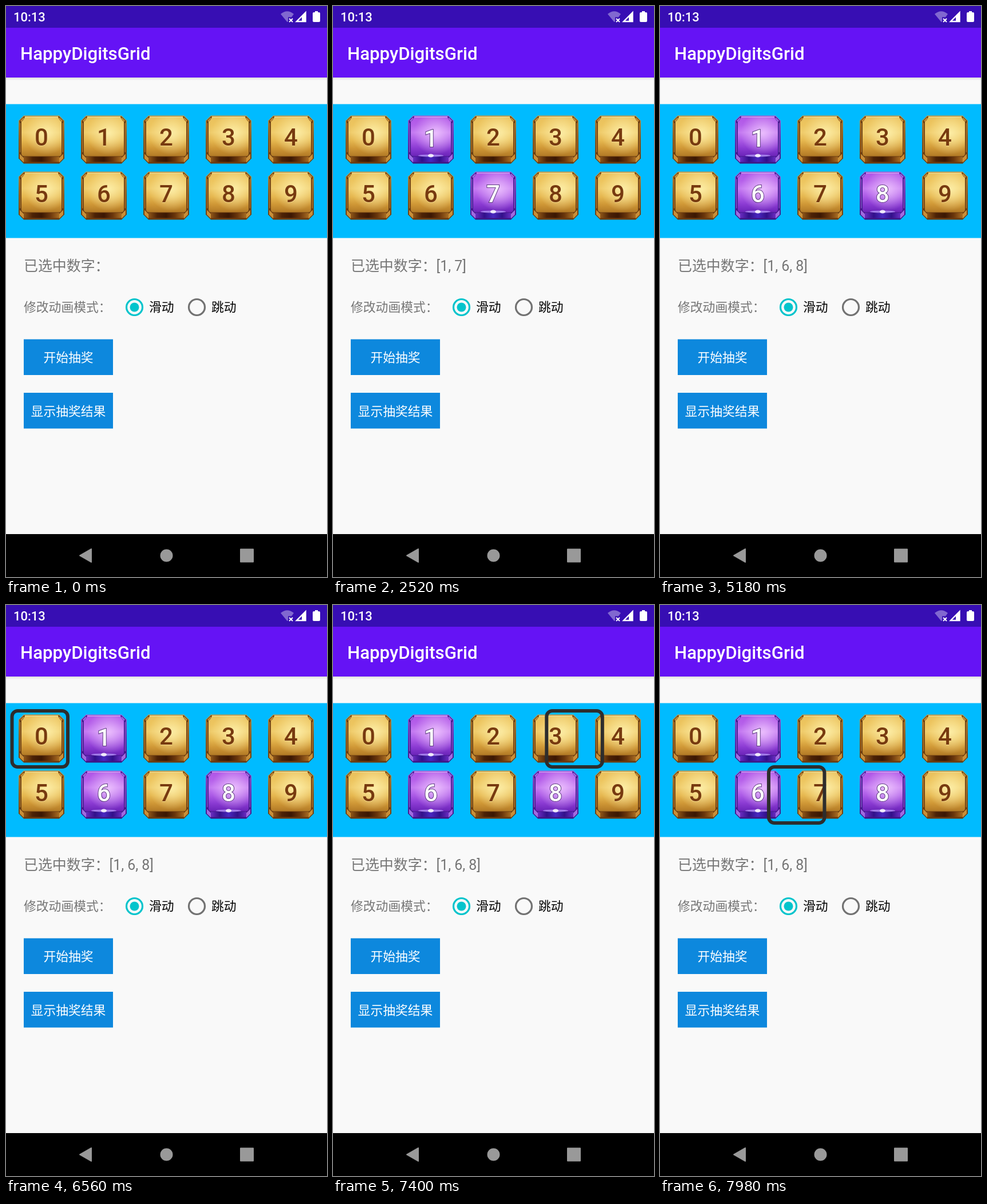
Write an HTML page that moves like this. It is 561 px wide and 998 px high and loops after 8 s.

```html
<!DOCTYPE html>
<html lang="zh-CN">
<head>
<meta charset="utf-8">
<style>
html, body { margin: 0; height: 100%; overflow: hidden; background: #f9f9f9; }
svg { display: block; width: 100%; height: 100%; }
text { font-family: Roboto, 'Noto Sans CJK SC', 'Noto Sans CJK', sans-serif; font-size: 21.8px; }
.digit { font-size: 42px; font-weight: 500; text-anchor: middle; }
.button { fill: #fff; text-anchor: middle; }
</style>
</head>
<body>
<svg viewBox="0 0 561 998">
  <defs id="defs">
    <linearGradient id="shade" x2="0" y2="1">
      <stop stop-color="#000" stop-opacity=".13"/><stop offset="1" stop-color="#000" stop-opacity="0"/>
    </linearGradient>
  </defs>
  <rect width="561" height="998" fill="#f9f9f9"/>
  <rect y="124" width="561" height="6" fill="url(#shade)"/>
  <rect y="37" width="561" height="88" fill="#6513f5"/>
  <rect width="561" height="38" fill="#370eb3"/>
  <text x="13" y="27" fill="#fff" style="font-size:22px;font-weight:500">10:13</text>
  <text x="25" y="94" fill="#fff" style="font-size:31.2px;font-weight:500">HappyDigitsGrid</text>

  <path d="M480 14Q491.500 4.500 503 14L499 19.500H493V27L491.500 28Z" fill="#8168d0"/>
  <path d="M495 22L501 28M501 22L495 28" stroke="#fff" stroke-width="2"/>
  <path d="M508 27H523.500V11.500Z" fill="none" stroke="#fff" stroke-width="2.400"/>
  <path d="M517 18L524 11V27H517Z" fill="#fff"/>
  <path d="M540 9H545V11H547Q549 11 549 13V26Q549 28 547 28H538Q536 28 536 26V13Q536 11 538 11H540Z" fill="#fff"/>

  <rect y="171.500" width="561" height="234" fill="#00bbff"/>
  <g id="tiles"></g>
  <rect id="cursor" x="-11.500" y="-6.500" width="97.500" height="98" rx="10" fill="none" stroke="#2d2d2d" stroke-width="6"/>

  <g fill="#757575">
    <text id="label" x="31" y="463" style="font-size:24.93px"></text>
    <text x="31" y="534">修改动画模式：</text>
  </g>
  <g fill="none" stroke-width="3.200">
    <circle cx="224.500" cy="526.500" r="14" stroke="#03c4cc"/>
    <circle cx="333.500" cy="526.500" r="14" stroke="#727272"/>
  </g>
  <circle cx="224.500" cy="526.500" r="8" fill="#03c4cc"/>
  <text x="250" y="534">滑动</text>
  <text x="359" y="534">跳动</text>
  <path d="M31 582.500H187V645H31ZM31 676H187V738.500H31Z" fill="#0d88dd"/>
  <text class="button" x="109" y="622">开始抽奖</text>
  <text class="button" x="109" y="715.500">显示抽奖结果</text>

  <rect y="923" width="561" height="75" fill="#000"/>
  <g fill="#999" stroke="#999" stroke-width="2" stroke-linejoin="round">
    <path d="M129 960.500L149 949V972Z"/>
    <circle cx="280.500" cy="960.500" r="10"/>
    <rect x="410" y="949.500" width="22" height="22"/>
  </g>
</svg>
<script>
const $ = id => document.getElementById(id);
const LOOP = 8000;

const stops = colors => colors.map((c, i) =>
  `<stop offset="${i / (colors.length - 1)}" stop-color="${c}"/>`).join('');

// A bevelled 80 x 84 key
function keyFace(id, { edge, face, bar, facet, glow, dark }, extra = '') {
  $('defs').innerHTML += `
    <linearGradient id="${id}Edge" x2="0" y2="1">${stops(edge)}</linearGradient>
    <linearGradient id="${id}Face" x2="0" y2="1">${stops(face)}</linearGradient>
    <linearGradient id="${id}Bar">${stops(bar)}</linearGradient>
    <radialGradient id="${id}Glow" cx=".62" cy=".42" r=".55">
      <stop stop-color="${glow}" stop-opacity=".85"/><stop offset="1" stop-color="${glow}" stop-opacity="0"/>
    </radialGradient>
    <g id="${id}">
      <path d="M9 0H71L80 9V75L71 84H9L0 75V9Z" fill="url(#${id}Edge)"/>
      <path d="M9 1.5H71L78.500 9V74L71 82H9L1.500 74V9Z" fill="${dark}"/>
      <path d="M2 67L9 74V82L2 75ZM78 67L71 74V82L78 75ZM3 9L9 3V6L5 11ZM77 9L71 3V6L75 11Z" fill="${facet}"/>
      <path d="M2 13H3.500V64H2ZM76.500 13H78V64H76.500Z" fill="${facet}" opacity=".7"/>
      <rect x="9" y="72" width="62" height="9" fill="url(#${id}Bar)"/>
      <path id="${id}Top" d="M11 2H69Q71 8 75 11V66Q75 71 70 71H10Q5 71 5 66V11Q9 8 11 2Z" fill="url(#${id}Face)"/>
      <path d="M11 2H69Q71 8 75 11V66Q75 71 70 71H10Q5 71 5 66V11Q9 8 11 2Z" fill="url(#${id}Glow)"/>
      <path d="M11 2.500H69" stroke="${glow}"/>${extra}
    </g>`;
}

keyFace('gold', {
  edge: ['#c89a45', '#8a5a1c', '#6b3b10'],
  face: ['#e9c05c', '#edc55f', '#f0cd6d', '#e6b850', '#cf9736', '#b27a26'],
  bar: ['#8f5618', '#4c2206', '#3b1703', '#6a360c', '#a86c22'],
  facet: '#c98f38', glow: '#fff3b0', dark: '#6a3c10'
});
keyFace('violet', {
  edge: ['#a463dc', '#6a2cb8', '#3b1580'],
  face: ['#b055e6', '#b560ea', '#c67cf2', '#ab5ae6', '#8a3ad2', '#6b24b8'],
  bar: ['#6a2cc0', '#32108a', '#4a28c0', '#32108a', '#6a2cc0'],
  facet: '#a06be0', glow: '#f0c8ff', dark: '#43188c'
}, `<ellipse cx="40" cy="70" rx="22" ry="2" fill="#b9a0ff" opacity=".7"/>
    <ellipse cx="40" cy="70" rx="5" ry="3" fill="#fff" opacity=".85"/>`);

const spot = n => ({ x: 22 + 109 * (n % 5), y: 191.5 + 98 * Math.floor(n / 5) });

function digit(n, dy, style) {
  return `<text class="digit" x="40" y="${(n < 5 ? 52.5 : 53.5) + dy}" ${style}>${n}</text>`;
}

$('tiles').innerHTML = Array.from({ length: 10 }, (_, n) => {
  const { x, y } = spot(n);
  return `<g transform="translate(${x} ${y})">
    <g><use href="#gold"/>${digit(n, 1, 'fill="#f8dc8c"')}${digit(n, 0, 'fill="#773a10"')}</g>
    <g><use href="#violet"/>${digit(n, n < 5 ? 2 : 0,
      'fill="#fff" stroke="#5d3a80" stroke-width="2" paint-order="stroke"')}</g>
  </g>`;
}).join('');

// Time of each tap and the digits chosen after it
const picks = [[0, ''], [500, '1'], [1340, '17'], [1980, '167'], [2520, '17'],
  [3080, '1'], [3820, '16'], [5180, '168']];

// The cursor is redrawn at these uneven moments
const ticks = [6560, 6620, 6680, 6740, 6880, 7000, 7140, 7200, 7260, 7340, 7400,
  7480, 7560, 7640, 7720, 7780, 7860, 7980];

function travel(t) {
  const s = (t - 6880) / 1000;
  return Math.max(0, 1 + 3.89 * s + 1.13 * s * s);
}

function draw(t) {
  const chosen = picks.findLast(p => p[0] <= t)[1];
  $('label').textContent = '已选中数字：' + (chosen && `[${[...chosen].join(', ')}]`);
  [...$('tiles').children].forEach((tile, n) => {
    const on = chosen.includes(n);
    tile.children[0].style.display = on ? 'none' : '';
    tile.children[1].style.display = on ? '' : 'none';
  });

  const tick = ticks.findLast(k => k <= t);
  $('cursor').style.display = tick ? '' : 'none';
  if (!tick) return;
  const pos = travel(tick), n = Math.floor(pos), part = pos - n;
  const a = spot(n), b = spot(n + 1);
  $('cursor').setAttribute('transform',
    `translate(${a.x + (b.x - a.x) * part} ${a.y + (b.y - a.y) * part})`);
}

function loop() {
  draw(performance.now() % LOOP);
  requestAnimationFrame(loop);
}
loop();
</script>
</body>
</html>
```
